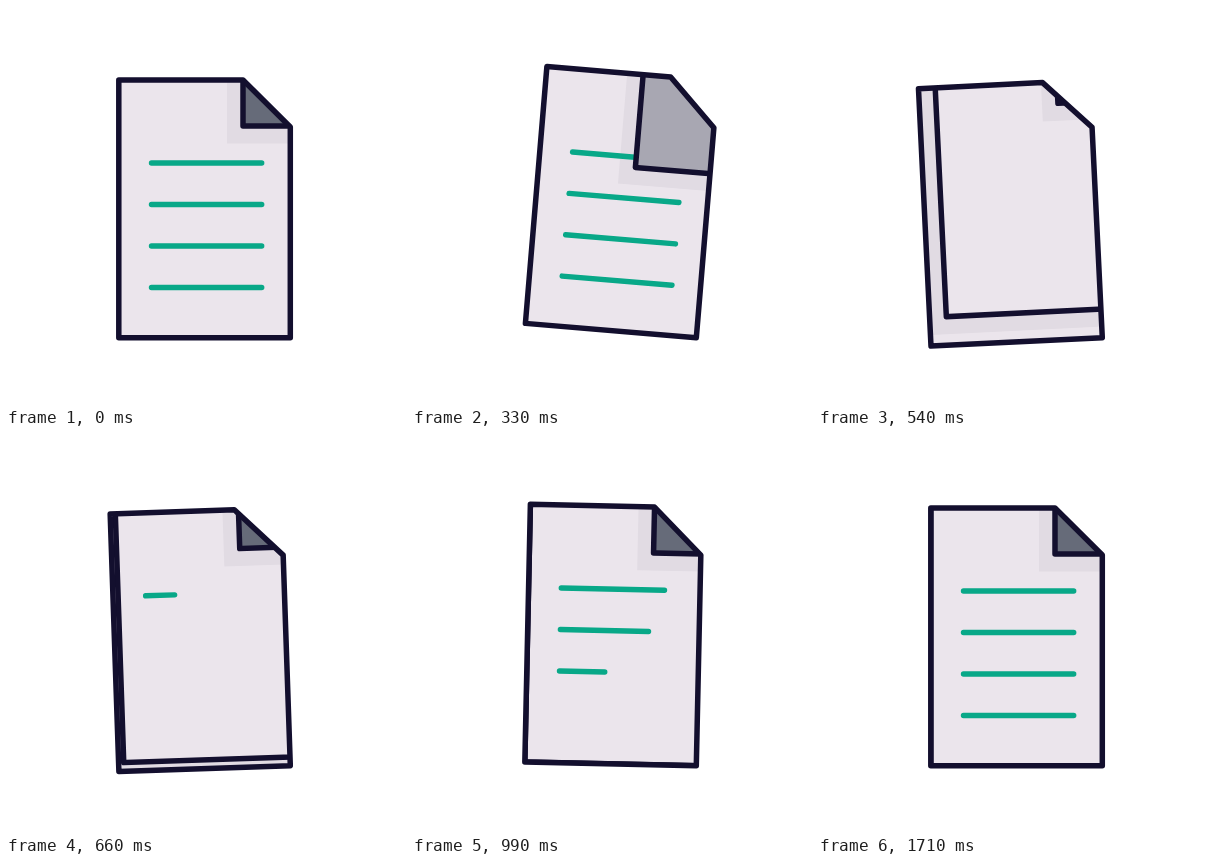
Animation, 400 px wide and 400 px high, one loop 4400 ms. Source, as an HTML page:

```html
<!DOCTYPE html>
<html lang="en">
<head>
<meta charset="utf-8">
<title>Turning page</title>
<style>
  html, body { margin: 0; width: 100%; height: 100%; overflow: hidden; background: #fff; }
  svg { display: block; width: 100%; height: 100%; }
  .ink { stroke: #130f2e; stroke-width: 5.5; stroke-linejoin: round; }
  .paper { fill: #ebe5ec; }
  .shade { fill: #e1dbe3; }
  .text { stroke: #08a888; stroke-width: 5.4; stroke-linecap: round; }
</style>
</head>
<body>
<svg viewBox="0 0 400 400">
  <defs>
    <clipPath id="sheet"><path d="M112.8 74H237L284.3 121V331.7H112.8Z"/></clipPath>
  </defs>
  <g id="page">
    <g clip-path="url(#sheet)">
      <rect class="paper" width="400" height="400"/>
      <path class="shade" id="turnShade"/>
      <g id="oldText"></g>
      <path class="ink" id="turn"/>
      <g id="newText"></g>
      <path class="shade" id="foldShade"/>
      <path class="ink" id="fold" fill="#666b79"/>
    </g>
    <path class="ink" fill="none" d="M112.8 74H237L284.3 121V331.7H112.8Z"/>
  </g>
</svg>
<script>
const LOOP = 4400, STEP = 30, LAST = 57;
const LEFT = 145.5, WIDTH = 110.2;
const $ = id => document.getElementById(id);

const clamp = v => Math.min(1, Math.max(0, v));
const smooth = u => u * u * (3 - 2 * u);
const mix = (a, b, u) => a + (b - a) * u;

// Fast rise with a long soft landing: cubic-bezier(.17, .36, .12, 1)
function settle(u) {
  if (u <= 0 || u >= 1) return clamp(u);
  const curve = (t, p, q) => 3 * p * t * (1 - t) ** 2 + 3 * q * t * t * (1 - t) + t ** 3;
  let lo = 0, hi = 1;
  for (let i = 0; i < 24; i++) {
    const mid = (lo + hi) / 2;
    if (curve(mid, .17, .12) < u) lo = mid; else hi = mid;
  }
  return curve(lo, .36, 1);
}

// [step, degrees]
const SWAY = [[0, 0], [7.5, 7], [19, -3], [29, 1.9], [39, 0]];
function sway(n) {
  for (let i = 1; i < SWAY.length; i++) {
    const [t0, a] = SWAY[i - 1], [t1, b] = SWAY[i];
    if (n < t1) return mix(a, b, smooth((n - t0) / (t1 - t0)));
  }
  return 0;
}

function addLines(group) {
  return [157, 198.5, 240, 281.5].map(y => {
    const line = document.createElementNS('http://www.w3.org/2000/svg', 'line');
    const attrs = { class: 'text', x1: LEFT, x2: LEFT + WIDTH, y1: y, y2: y };
    for (const key in attrs) line.setAttribute(key, attrs[key]);
    group.append(line);
    return line;
  });
}
addLines($('oldText'));
const newLines = addLines($('newText'));

// The flap corner travels on a straight path: k = 0 resting fold, k = 1 bottom left.
function placeFlap(name, k) {
  const x = 237 - 124.2 * k, y = 120 + 211.7 * k;
  const shape = (x, y) => `M${x} -100V${y}H500V-100Z`;
  $(name).setAttribute('d', shape(x, y));
  $(name + 'Shade').setAttribute('d', shape(x - 16, y + 17.5));
}

function mixColor(u) {
  const dark = [102, 107, 121], light = [235, 229, 236];
  return `rgb(${dark.map((c, i) => Math.round(mix(c, light[i], u)))})`;
}

function draw(n) {
  $('page').setAttribute('transform', `rotate(${sway(n)} 284.5 331.7)`);

  const k = settle((n - 9.5) / 19);
  placeFlap('turn', k);
  $('turn').setAttribute('fill', mixColor(clamp(k / .45)));
  $('oldText').style.display = n < 20 ? '' : 'none';

  placeFlap('fold', mix(-.27, 0, settle((n - 15) / 15)));
  const folding = n > 15 ? '' : 'none';
  $('fold').style.display = $('foldShade').style.display = folding;

  newLines.forEach((line, i) => {
    const p = settle((n - 20 - 5 * i) / 22);
    line.style.display = p > 0 ? '' : 'none';
    line.setAttribute('x2', LEFT + WIDTH * p);
  });
}

const start = performance.now();
function tick() {
  const t = (performance.now() - start) % LOOP;
  draw(Math.min(LAST, Math.floor(t / STEP)));
  requestAnimationFrame(tick);
}
tick();
</script>
</body>
</html>
```
